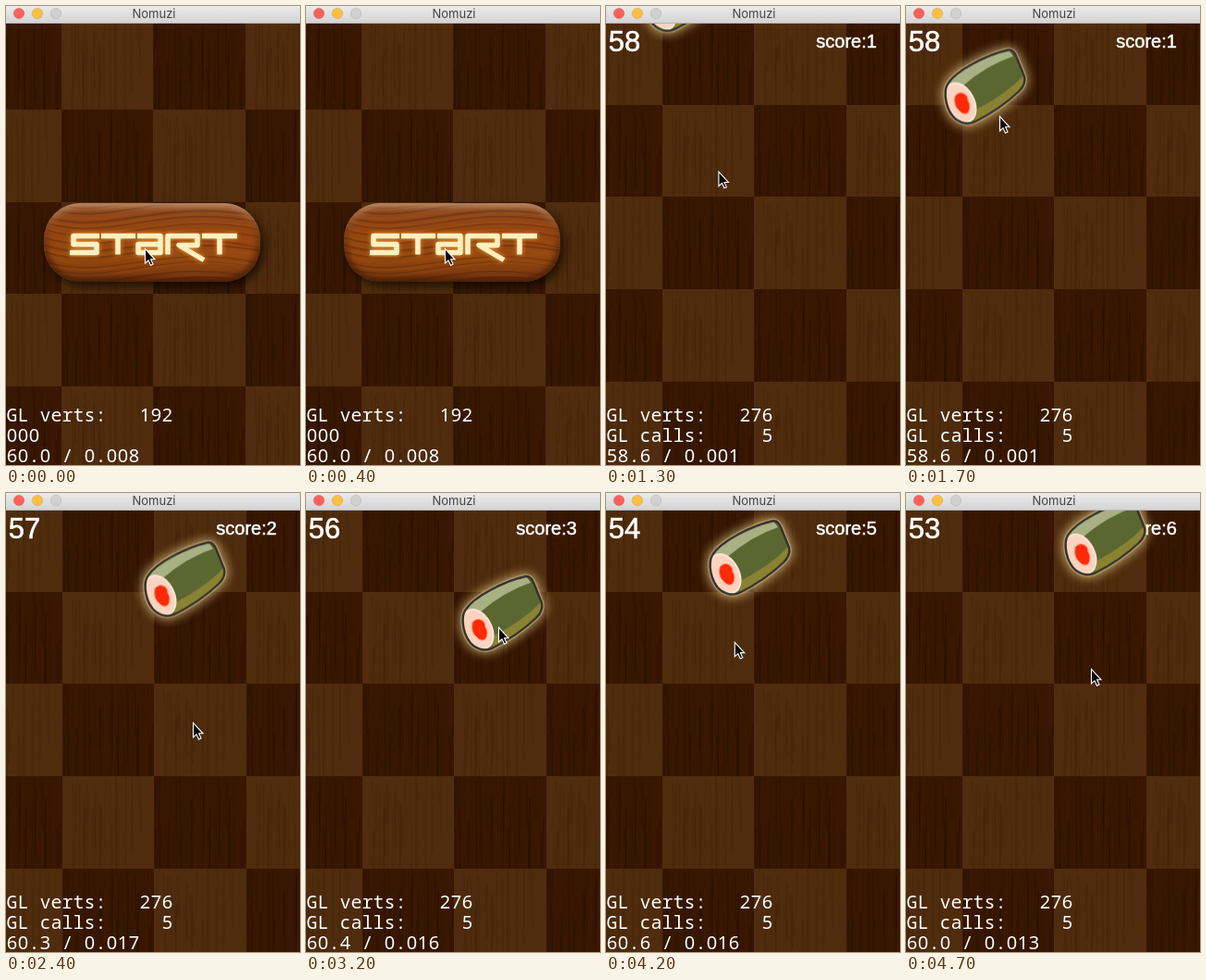
An HTML page with a canvas for the animation above (4.8 s loop, 318 by 496 pixels).

```html
<!DOCTYPE html>
<html lang="en">
<head>
<meta charset="utf-8">
<title>Nomuzi</title>
<style>
html, body { margin: 0; width: 100%; height: 100%; overflow: hidden; background: #34170a; }
canvas { display: block; }
</style>
</head>
<body>
<canvas id="stage" width="318" height="496"></canvas>
<script>
const ctx = document.getElementById('stage').getContext('2d');
const LOOP = 4800, STEP = 100, GAME_START = 500;
const SPEED = 0.25; // fall in px per ms
const SANS = '"Liberation Sans", Arial, sans-serif';
const MONO = '20px "Noto Sans Mono", "DejaVu Sans Mono", monospace';
const DIGITS = '20px "Noto Sans", "Open Sans", sans-serif';

// one entry per round: where the roll falls, and the frame rate shown
const columns = [69, 60, 168, 187, 94, 130, 190];
const rates = ['53.0 / 0.005', '58.6 / 0.001', '60.3 / 0.017', '60.4 / 0.016',
  '61.2 / 0.017', '60.6 / 0.016', '60.0 / 0.013'];

// the player catches each roll a little sooner than the last
const bornAt = n => 580 + 710 * n - 11.3 * n * n;

// pointer waypoints: time, x, y
const path = [[800, 150, 264], [1700, 101, 121], [2400, 202, 250],
  [3200, 208, 147], [3800, 95, 142], [4700, 200, 192]];

function seeded(s) {
  return () => (s = (s * 16807) % 2147483647) / 2147483647;
}

function layer(w, h, draw) {
  const c = document.createElement('canvas');
  c.width = w;
  c.height = h;
  draw(c.getContext('2d'));
  return c;
}

function paint(g, shape, color) {
  g.fillStyle = color;
  g.fill(shape);
}

function outline(g, shape, color, width) {
  g.strokeStyle = color;
  g.lineWidth = width;
  g.stroke(shape);
}

function gradient(g, y0, y1, ...colors) {
  const fill = g.createLinearGradient(0, y0, 0, y1);
  colors.forEach((c, i) => fill.addColorStop(i / (colors.length - 1), c));
  return fill;
}

function tile(base, dark, light, seed) {
  return layer(100, 100, g => {
    const rnd = seeded(seed);
    g.fillStyle = base;
    g.fillRect(0, 0, 100, 100);
    for (let i = 0; i < 50; i++) {
      const x = rnd() * 100, y = rnd() * 80 - 20, len = 40 + rnd() * 90, bend = rnd() * 6 - 3;
      const grain = new Path2D(`M${x} ${y}q${bend} ${len / 2} 0 ${len}`);
      outline(g, grain, i % 2 ? dark : light, 0.8 + rnd() * 1.4);
    }
  });
}

const darkTile = tile('#371702', 'rgba(24,7,0,.22)', 'rgba(78,34,10,.18)', 71);
const lightTile = tile('#4f2c0d', 'rgba(52,26,6,.16)', 'rgba(90,54,22,.12)', 29);

function board(x0, y0, parity) {
  return layer(318, 496, g => {
    for (let r = 0; r < 5; r++)
      for (let c = 0; c < 4; c++) {
        const wood = (r + c + parity) % 2 ? darkTile : lightTile;
        g.drawImage(wood, Math.round(x0 + c * 99.6), Math.round(y0 + r * 99.6));
      }
  });
}

const menuBoard = board(-40, 12.4, 1);
const gameBoard = board(-39, 7.1, 0);

const button = layer(318, 496, g => {
  const shape = new Path2D();
  shape.roundRect(41, 213, 234, 85, 39);
  g.save();
  g.shadowColor = 'rgba(0,0,0,.6)';
  g.shadowBlur = 10;
  g.shadowOffsetX = 4;
  g.shadowOffsetY = 5;
  paint(g, shape, '#84400f');
  g.restore();

  g.save();
  g.clip(shape);
  paint(g, shape, gradient(g, 213, 298, '#8a4a24', '#944510', '#95480f', '#74350d'));
  const rnd = seeded(47);
  for (let i = 0; i < 34; i++) {
    const y = 195 + i * 4 + rnd() * 3;
    const grain = new Path2D(`M36 ${y - 8}C110 ${y + 20} 165 ${y - 30} 280 ${y - rnd() * 8}`);
    outline(g, grain, i % 2 ? 'rgba(64,24,2,.28)' : 'rgba(180,86,26,.2)', 1 + rnd() * 1.5);
  }
  g.filter = 'blur(3px)';
  const rim = gradient(g, 213, 298, 'rgba(205,160,125,.8)', 'rgba(110,62,32,.6)', 'rgba(50,18,4,.6)', 'rgba(60,26,8,.8)');
  outline(g, shape, rim, 9);
  g.restore();

  const word = new Path2D(
    'M101 248.5H73v9H98v9H69' +
    'M103 248.5h37m-19 0v20' +
    'M142 248.5h25v18H143v-9h24' +
    'M175 268.5v-20h32v10H187l27 16' +
    'M212 248.5h38m-19 0v20');
  g.lineJoin = 'round';
  g.shadowColor = '#f0a040';
  g.shadowBlur = 5;
  outline(g, word, '#fff0c0', 5.5);
});

const body = new Path2D('M-15-21C-6-36 28-53 51-58Q57-58 60-49L68-29Q70-21 62-13Q42 6 14 20Q4 24-6 17C-17 8-20-12-15-21Z');
const ridge = new Path2D('M-15-21C-6-36 28-53 51-58L56-51Q28-42 0-18Z');
const belly = new Path2D('M17 6Q48-10 67-30L69-20Q44 6 14 20Z');

const roll = layer(140, 140, g => {
  g.translate(40, 90);
  g.save();
  g.shadowColor = 'rgba(250,225,160,.9)';
  g.shadowBlur = 13;
  paint(g, body, '#b59d68');
  outline(g, body, 'rgba(215,190,135,.5)', 5);
  g.restore();

  g.save();
  g.clip(body);
  paint(g, body, '#5b6731');
  paint(g, belly, '#8a8233');
  paint(g, ridge, '#a9b083');
  const face = new Path2D();
  face.ellipse(-1, -1, 14.5, 22.5, -0.48, 0, 7);
  paint(g, face, '#fbd3bf');
  outline(g, face, '#fce6d8', 2);
  g.restore();

  const core = new Path2D('M-7-8Q-3-13 2-11Q7-9 7-3Q11 3 7 10Q2 13-2 8Q-9 3-7-8Z');
  paint(g, core, '#ff2a06');
  outline(g, core, '#ff8c6c', 1);
  g.lineJoin = 'round';
  outline(g, body, '#35322b', 2.4);
});

function text(str, x, y, font, color = '#fff', weight = 0) {
  ctx.font = font;
  ctx.fillStyle = ctx.strokeStyle = color;
  ctx.fillText(str, x, y);
  ctx.lineWidth = weight;
  if (weight) ctx.strokeText(str, x, y);
}

// fixed 12 px cells, with plain digits
function readout(str, y) {
  ctx.textAlign = 'center';
  [...str].forEach((c, i) => text(c, 6.5 + i * 12, y, /\d/.test(c) ? DIGITS : MONO));
  ctx.textAlign = 'left';
}

function titleBar() {
  ctx.fillStyle = gradient(ctx, 0, 18, '#ebebeb', '#d4d4d4');
  ctx.fillRect(0, 0, 318, 18);
  ctx.fillStyle = '#b4b2b0';
  ctx.fillRect(0, 18, 318, 1);
  ['#fc605b', '#fdbe41', '#d0d0d0'].forEach((color, i) => {
    const dot = new Path2D();
    dot.arc(14 + i * 20, 8, 5.8, 0, 7);
    paint(ctx, dot, color);
    outline(ctx, dot, 'rgba(0,0,0,.12)', 0.8);
  });
  ctx.textAlign = 'center';
  text('Nomuzi', 160, 13, '13px Inter, ' + SANS, '#444');
  ctx.textAlign = 'left';
}

function cursor(t) {
  const next = Math.max(1, path.findIndex(p => p[0] >= t));
  const [t0, x0, y0] = path[next - 1], [t1, x1, y1] = path[next];
  const k = Math.max(0, (t - t0) / (t1 - t0));
  const ease = k * k * (3 - 2 * k);
  ctx.save();
  ctx.translate(x0 + (x1 - x0) * ease, y0 + (y1 - y0) * ease);
  const arrow = new Path2D('M.5-1.5V14L4 10.8L6.5 16.2L9 15L6.6 9.8H11Z');
  paint(ctx, arrow, '#0a0604');
  outline(ctx, arrow, '#fff', 1.1);
  ctx.restore();
}

function menu() {
  ctx.drawImage(menuBoard, 0, 0);
  ctx.drawImage(button, 0, 0);
  readout('GL verts:   192', 449);
  readout('000', 471);
  readout('60.0 / 0.008', 493);
}

function game(t) {
  let n = 0;
  while (n + 1 < columns.length && bornAt(n + 1) <= t) n++;
  ctx.drawImage(gameBoard, 0, 0);
  text(59 - n, 2.8, 49, '31px ' + SANS, '#fff', 0.6);
  text('score:' + n, 227.3, 45, '20px ' + SANS, '#fff', 0.5);
  ctx.drawImage(roll, columns[n] - 40, Math.max(-40, (t - bornAt(n)) * SPEED) - 90);
  readout('GL verts:   276', 449);
  readout('GL calls:     5', 471);
  readout(rates[n], 493);
}

function render(t) {
  if (t < GAME_START) menu();
  else game(t);
  titleBar();
  cursor(t);
}

const start = performance.now();
function tick() {
  const t = (performance.now() - start) % LOOP;
  render(Math.floor(t / STEP) * STEP);
  requestAnimationFrame(tick);
}
tick();
</script>
</body>
</html>
```
